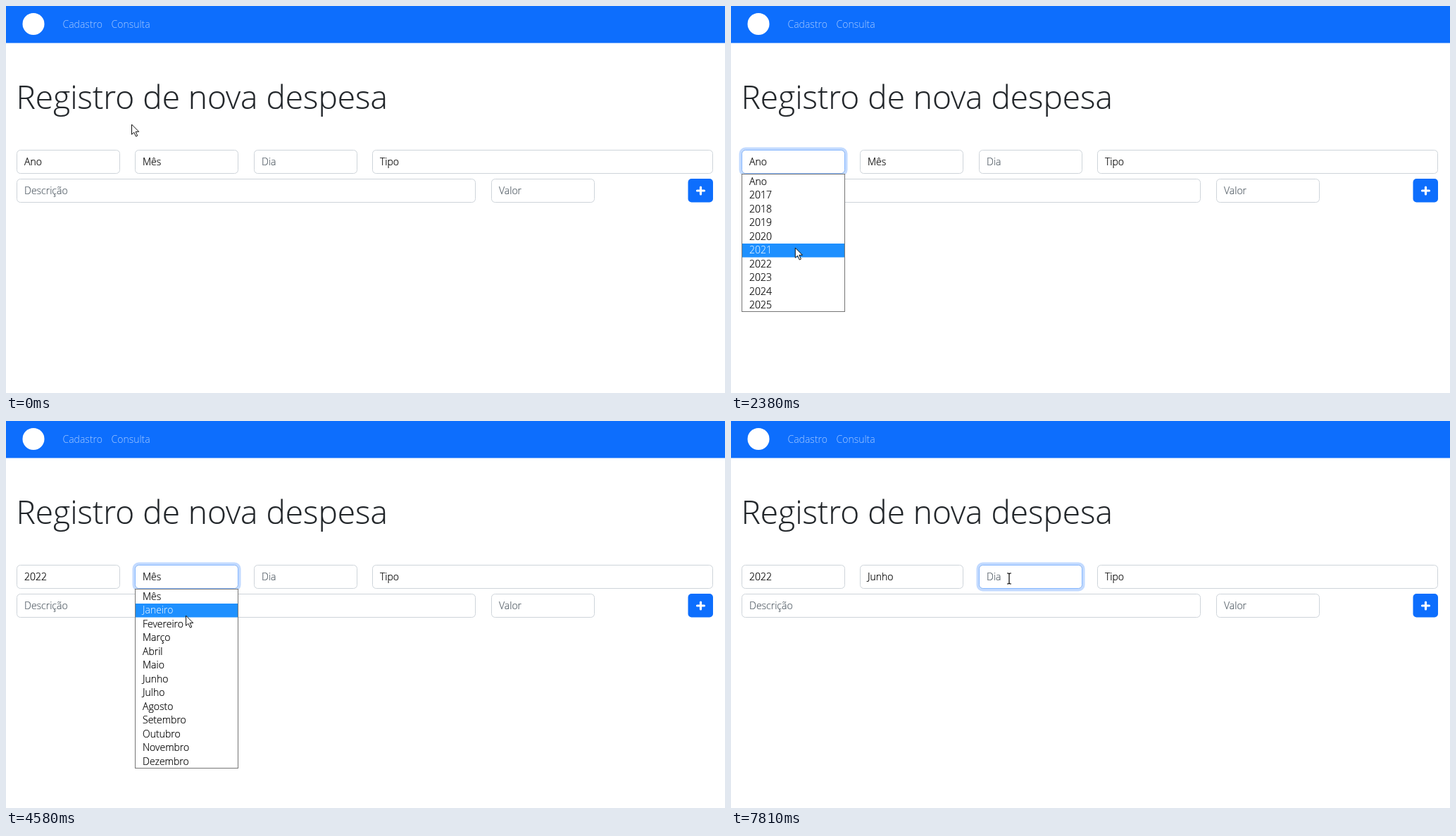
Write an HTML page that moves like this. It is 1021 px wide and 549 px high and loops after 8000 ms.

```html
<!DOCTYPE html>
<html lang="pt-BR">
<head>
<meta charset="utf-8">
<title>Registro de nova despesa</title>
<style>
  html, body { margin: 0; width: 100%; height: 100%; overflow: hidden; background: #fff; }
  svg { display: block; font: 300 14px "Open Sans", "Noto Sans", sans-serif; }
  text { fill: #000; stroke: #000; stroke-width: .2; }
  .title { font-size: 46px; fill: #212529; stroke: #212529; }
  .nav { fill: #fff; fill-opacity: .65; stroke: none; }
  .hint { fill: #566069; stroke: #566069; }
  .active { fill: #fff; stroke: none; }
  .box { fill: #fff; stroke: #ced4da; }
  .ring { fill: none; stroke: #0d6efd; stroke-opacity: .25; stroke-width: 3.5; }
  .glow { fill: none; stroke: #86b7fe; }
  .menu { fill: #fff; stroke: #767676; }
  .mark { fill: #1e90ff; }
</style>
</head>
<body>
<svg id="stage" width="1021" height="549" viewBox="0 0 1021 549"></svg>
<script>
const LOOP = 8000, TICK = 70;
const LEFT = 15, COLUMN = 168.5, GUTTER = 21.3, FIELD = 34, LINES = [204, 245];
const ROW = 19.53, MENU_TOP = LINES[0] + FIELD + 1;
const stage = document.getElementById('stage');

function add(tag, attrs, parent = stage, text) {
  const node = document.createElementNS('http://www.w3.org/2000/svg', tag);
  for (const key in attrs) node.setAttribute(key, attrs[key]);
  if (text) node.textContent = text;
  parent.append(node);
  return node;
}
const label = (text, x, y, cls = '', parent = stage) =>
  add('text', { x, y, class: cls }, parent, text);
const show = (node, on) => node.setAttribute('visibility', on ? 'visible' : 'hidden');
const clamp = v => Math.min(1, Math.max(0, v));

// Page
add('rect', { width: 1021, height: 52.5, fill: '#0d6efd' });
add('circle', { cx: 39, cy: 25.5, r: 15.5, fill: '#fff' });
label('Cadastro', 80.5, 31, 'nav');
label('Consulta', 149.5, 31, 'nav');
label('Registro de nova despesa', 14.5, 146, 'title');

// A field sits on a grid line, starts at a column and spans some columns.
function field(text, line, column, span, cls) {
  const x = Math.floor(LEFT + COLUMN * column), y = LINES[line];
  const width = Math.floor(COLUMN * span - GUTTER);
  const frame = (grow, name, parent) => add('rect', {
    x: x + .5 - grow, y: y + .5 - grow, rx: 5 + grow, class: name,
    width: width - 1 + 2 * grow, height: FIELD - 1 + 2 * grow
  }, parent);
  frame(0, 'box');
  const focus = add('g', { opacity: 0 });
  frame(2.25, 'ring', focus);
  frame(0, 'glow', focus);
  const contains = (px, py) => px > x && px < x + width && py > y && py < y + FIELD;
  return { x, focus, contains, text: label(text, x + 11, y + 22, cls) };
}
const year = field('Ano', 0, 0, 1);
const month = field('Mês', 0, 1, 1);
const day = field('Dia', 0, 2, 1, 'hint');
field('Tipo', 0, 3, 3);
const inputs = [day, field('Descrição', 1, 0, 4, 'hint'), field('Valor', 1, 4, 1, 'hint')];

add('rect', { x: 968.5, y: LINES[1], width: 35.5, height: FIELD - .5, rx: 5, fill: '#0d6efd' });
add('path', { d: 'M986.5 257v10M981.5 262h10', stroke: '#fff', 'stroke-width': 3.2, 'stroke-linecap': 'round' });
const caret = add('path', { d: 'M363.5 212v19', stroke: '#000' });

// Option lists
function menu({ x }, options) {
  const group = add('g', {});
  const height = Math.round(options.length * ROW);
  add('rect', { x: x + .5, y: MENU_TOP - .5, width: 146, height, class: 'menu' }, group);
  const mark = add('rect', { x: x + 1, width: 145, height: ROW, class: 'mark' }, group);
  const rows = options.map((text, i) =>
    label(text, x + 11, Math.round(MENU_TOP + i * ROW + 14.5), '', group));
  return { group, mark, rows };
}
const years = menu(year, ['Ano', ...Array.from({ length: 9 }, (_, i) => 2017 + i)]);
const months = menu(month, ['Mês', 'Janeiro', 'Fevereiro', 'Março', 'Abril', 'Maio', 'Junho',
  'Julho', 'Agosto', 'Setembro', 'Outubro', 'Novembro', 'Dezembro']);

function drawMenu({ group, mark, rows }, open, pointerY) {
  show(group, open);
  const active = Math.max(0, Math.floor((pointerY - MENU_TOP - 1) / ROW));
  mark.setAttribute('y', Math.round(MENU_TOP + active * ROW));
  rows.forEach((row, i) => row.classList.toggle('active', i === active));
}

// Pointer
const arrow = add('path', {
  d: 'M0 0V14.2L3.3 11.2L6 17L8.2 16L5.6 10.3H10.2Z', fill: '#fff', stroke: '#111'
});
const beam = add('path', {
  d: 'M-3 -7.5H-1L0 -6.5L1 -7.5H3M0 -6.5V6.5M-3 7.5H-1L0 6.5L1 7.5H3',
  fill: 'none', stroke: '#000', 'stroke-width': 1.2
});

const linear = p => p;
const glide = p => Math.sin(p * Math.PI / 2);
const moves = [];
let rest = [178.5, 168];
function move(start, end, to, ease = linear) {
  moves.push({ start, end, from: rest, to, ease });
  rest = to;
}
move(330, 1080, [102, 213]);
move(1550, 2310, [91, 337]);
move(2380, 2590, [92, 361]);
move(2850, 3480, [248, 224], glide);
move(4090, 4800, [257, 286], glide);
move(4930, 5690, [260, 330]);
move(5760, 6310, [262, 358]);
move(6450, 6930, [389, 215]);
move(7130, 7200, [395, 223.5]);

// The pointer advances once per tick and already moves on the first one.
function pointerAt(t) {
  const { start, end, from, to, ease } = moves.findLast(m => m.start <= t) || moves[0];
  const gaps = Math.round((end - start) / TICK);
  const step = Math.floor((t - start) / (end - start) * gaps + .01) + 1;
  const p = ease(clamp(step / (gaps + 1)));
  return from.map((v, i) => v + (to[i] - v) * p);
}

const fade = (t, start, end) => t < start ? 0 : clamp((t - start + TICK) / (end - start + TICK));

function draw(t) {
  const [x, y] = pointerAt(t);
  const yearsOpen = t >= 1220 && t < 2850, monthsOpen = t >= 3700 && t < 6450;
  const toMonth = fade(t, 3700, 3760), toDay = fade(t, 7200, 7350);

  year.focus.setAttribute('opacity', fade(t, 1150, 1360) - toMonth);
  month.focus.setAttribute('opacity', toMonth - toDay);
  day.focus.setAttribute('opacity', toDay);
  year.text.textContent = t < 2850 ? 'Ano' : '2022';
  month.text.textContent = t < 6450 ? 'Mês' : 'Junho';
  show(caret, t >= 7280 && t < 7810);

  drawMenu(years, yearsOpen, y);
  drawMenu(months, monthsOpen, y);

  const typing = !yearsOpen && !monthsOpen && inputs.some(f => f.contains(x, y));
  show(arrow, !typing);
  show(beam, typing);
  for (const node of [arrow, beam]) node.setAttribute('transform', `translate(${x} ${y})`);
}

const begin = performance.now();
function tick() {
  draw((performance.now() - begin) % LOOP);
  requestAnimationFrame(tick);
}
tick();
</script>
</body>
</html>
```
